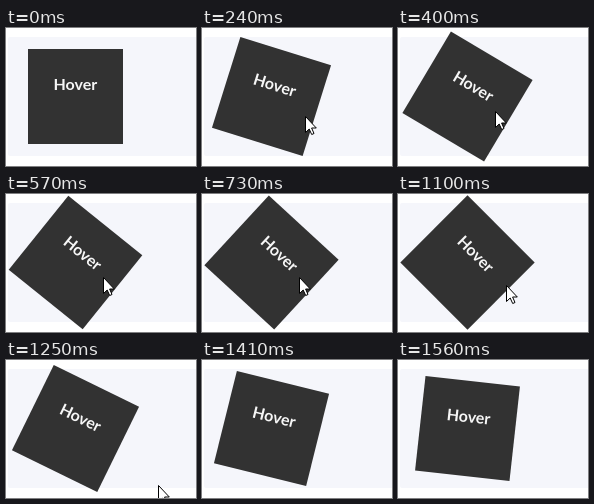
Animation of 190x138 px, one loop 1.64 s. Source, as an HTML page:

```html
<!DOCTYPE html>
<html lang="en">
<head>
<meta charset="utf-8">
<title>Hover rotation</title>
<style>
  html, body { margin: 0; width: 100%; height: 100%; overflow: hidden; background: #fff; }
  svg { display: block; width: 190px; height: 138px; }
  text { font: bold 16px Lato, sans-serif; fill: #f6f6f6; text-anchor: middle; }
</style>
</head>
<body>
<svg viewBox="0 0 190 138">
  <path d="M190 9H4Q2 9 2 11V126Q2 128 4 128H190Z" fill="#f5f6fb"/>
  <g id="box">
    <rect x="22" y="21" width="95" height="95" fill="#323232"/>
    <text x="69.3" y="62.3">Hover</text>
  </g>
  <path id="cursor" d="M.5.5V16.5L4.2 13L6.7 18.5L9 17.5L6.6 12H11.3Z" fill="#fff" stroke="#000"/>
</svg>
<script>
  const DURATION = 1000, LEAVE = 995;
  const ENTER = 70, SETTLE = 400, DEPART = 950, GONE = 1250;
  const phases = [0, 570, 1100, 1640]; // turn, rest, turn back
  const STEPS = 7; // refreshes per phase
  const LOOP = phases.at(-1);
  const box = document.getElementById('box');
  const cursor = document.getElementById('cursor');

  const bezier = (u, a, b) => 3 * u * (1 - u) ** 2 * a + 3 * u * u * (1 - u) * b + u ** 3;

  // The CSS "ease" curve
  function ease(p) {
    if (p <= 0) return 0;
    if (p >= 1) return 1;
    let lo = 0, hi = 1;
    for (let i = 0; i < 24; i++) {
      const mid = (lo + hi) / 2;
      if (bezier(mid, 0.25, 0.25) < p) lo = mid; else hi = mid;
    }
    return bezier(lo, 0.1, 1);
  }

  // Latest refresh, on a 10 ms clock
  function refreshAt(time) {
    const i = phases.findLastIndex(p => p <= time);
    const step = (phases[i + 1] - phases[i]) / STEPS;
    const tick = k => Math.floor((phases[i] + k * step) / 10) * 10;
    let k = STEPS - 1;
    while (tick(k) > time) k--;
    return tick(k);
  }

  function angleAt(t) {
    return 45 * (t <= phases[2] ? ease(t / DURATION) : 1 - ease((t - LEAVE) / DURATION));
  }

  // The pointer slows into its resting place and speeds up when leaving
  function pointerAt(t) {
    const arriving = t < DEPART;
    const [dx, dy] = arriving ? [32, 30] : [55, 42];
    const far = arriving ? (SETTLE - t) / (SETTLE - ENTER) : (t - DEPART) / (GONE - DEPART);
    const k = Math.max(far, 0) ** 2.35;
    return [Math.round(97 + dx * k), Math.round(83 + dy * k)];
  }

  function draw(time) {
    const t = refreshAt(time);
    const visible = t >= ENTER && t <= GONE;
    box.setAttribute('transform', `rotate(${angleAt(t)} 69.5 68.5)`);
    cursor.setAttribute('visibility', visible ? 'visible' : 'hidden');
    cursor.setAttribute('transform', `translate(${pointerAt(t)})`);
  }

  const start = performance.now();
  function loop() {
    draw((performance.now() - start) % LOOP);
    requestAnimationFrame(loop);
  }
  loop();
</script>
</body>
</html>
```
